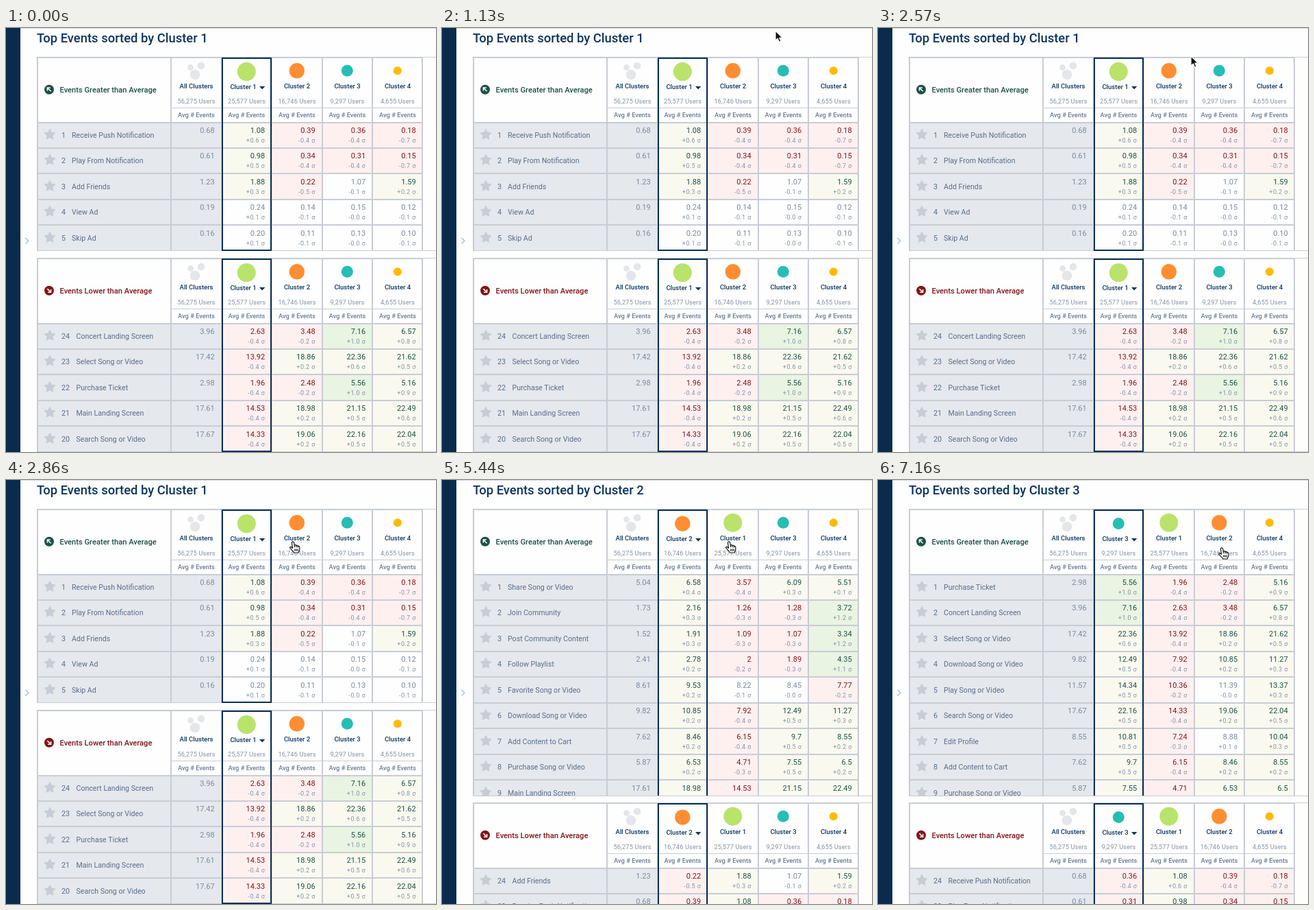
An HTML page with a canvas that plays this animation: 628 by 618 pixels, repeating every 8 s.

```html
<!DOCTYPE html>
<html lang="en">
<head>
<meta charset="utf-8">
<title>Top Events by Cluster</title>
<style>
html, body { margin: 0; width: 100%; height: 100%; overflow: hidden; background: #fdfefd; }
canvas { display: block; width: 628px; height: 618px; }
</style>
</head>
<body>
<canvas id="stage"></canvas>
<script>
const W = 628, H = 618, LOOP = 8000;
const canvas = document.getElementById('stage');
const ctx = canvas.getContext('2d');
const dpr = window.devicePixelRatio || 1;
canvas.width = W * dpr;
canvas.height = H * dpr;

const C = {
  bg: '#fdfefd', navy: '#0a2b4c', ink: '#0d3560', frame: '#0a3157', line: '#c8ccd5', shade: '#e5e8ec',
  name: '#5a6d8a', muted: '#8492a8', value: '#7b8aa2',
  up: '#1c5147', down: '#80151a', cream: '#f9f9ef', pink: '#fff0f0', green: '#e9f4e2'
};

// name: average of all users, averages of clusters 1-4, standard deviation
const EVENTS = {
  push: 'Receive Push Notification: 0.68 1.08 0.39 0.36 0.18 0.72',
  from: 'Play From Notification: 0.61 0.98 0.34 0.31 0.15 0.69',
  friends: 'Add Friends: 1.23 1.88 0.22 1.07 1.59 2',
  view: 'View Ad: 0.19 0.24 0.14 0.15 0.12 0.9',
  skip: 'Skip Ad: 0.16 0.20 0.11 0.13 0.10 0.7',
  concert: 'Concert Landing Screen: 3.96 2.63 3.48 7.16 6.57 3.15',
  select: 'Select Song or Video: 17.42 13.92 18.86 22.36 21.62 8.2',
  ticket: 'Purchase Ticket: 2.98 1.96 2.48 5.56 5.16 2.5',
  main: 'Main Landing Screen: 17.61 14.53 18.98 21.15 22.49 7.7',
  search: 'Search Song or Video: 17.67 14.33 19.06 22.16 22.04 8.5',
  share: 'Share Song or Video: 5.04 3.57 6.58 6.09 5.51 3.8',
  join: 'Join Community: 1.73 1.26 2.16 1.28 3.72 1.65',
  post: 'Post Community Content: 1.52 1.09 1.91 1.07 3.34 1.52',
  follow: 'Follow Playlist: 2.41 2 2.78 1.89 4.35 1.75',
  favorite: 'Favorite Song or Video: 8.61 8.22 9.53 8.45 7.77 4.8',
  download: 'Download Song or Video: 9.82 7.92 10.85 12.49 11.27 5',
  cart: 'Add Content to Cart: 7.62 6.15 8.46 9.7 8.55 4',
  buy: 'Purchase Song or Video: 5.87 4.71 6.53 7.55 6.5 3.5',
  play: 'Play Song or Video: 11.57 10.36 11.39 14.34 13.37 5.6',
  edit: 'Edit Profile: 8.55 7.24 8.88 10.81 10.04 4.5'
};
for (const key in EVENTS) {
  const [name, data] = EVENTS[key].split(': ');
  const nums = data.split(' ');
  EVENTS[key] = { name, sd: +nums.pop(), avg: nums };
}

const CLUSTERS = [
  { name: 'All Clusters', users: '56,275' },
  { name: 'Cluster 1', users: '25,577', r: 13.5, color: '#b9e36b' },
  { name: 'Cluster 2', users: '16,746', r: 11.2, color: '#ff8e32' },
  { name: 'Cluster 3', users: '9,297', r: 8.5, color: '#26bdb5' },
  { name: 'Cluster 4', users: '4,655', r: 6, color: '#ffba08' }
];

const VIEWS = [
  { from: 0, order: [0, 1, 2, 3, 4], split: 325,
    top: 'push from friends view skip', low: 'concert select ticket main search' },
  { from: 4000, order: [0, 2, 1, 3, 4], split: 460,
    top: 'share join post follow favorite download cart buy main', low: 'friends push' },
  { from: 7160, order: [0, 3, 1, 2, 4], split: 460,
    top: 'ticket concert select download play search edit cart buy', low: 'push from' }
];

const LEFT = 45, RIGHT = 609, PITCH = 37.5;
const colX = i => 241 + 73.5 * i;

function rect(x, y, w, h, color) {
  ctx.fillStyle = color;
  ctx.fillRect(x, y, w, h);
}

function disc(x, y, r, color) {
  ctx.fillStyle = color;
  ctx.beginPath();
  ctx.arc(x, y, r, 0, Math.PI * 2);
  ctx.fill();
}

function text(str, x, y, size, color, weight = 400, align = 'left', spacing = 0) {
  ctx.font = `${weight} ${size}px Roboto, sans-serif`;
  ctx.letterSpacing = spacing + 'px';
  ctx.textAlign = align;
  ctx.fillStyle = color;
  ctx.fillText(str, x, y);
}

function stroke(points, width, color) {
  ctx.beginPath();
  points.forEach(([x, y]) => ctx.lineTo(x, y));
  ctx.lineWidth = width;
  ctx.strokeStyle = color;
  ctx.stroke();
}

function star(x, y) {
  ctx.beginPath();
  for (let i = 0; i < 10; i++) {
    const r = i % 2 ? 4.2 : 8.2, a = Math.PI * (i / 5 - 0.5);
    ctx.lineTo(x + r * Math.cos(a), y + r * Math.sin(a));
  }
  ctx.closePath();
  ctx.lineJoin = 'round';
  ctx.lineWidth = 1;
  ctx.fillStyle = ctx.strokeStyle = C.line;
  ctx.fill();
  ctx.stroke();
}

// Round badge with a diagonal arrow: dir -1 is up-left, 1 is down-right
function badge(x, y, dir, color) {
  disc(x, y, 7, color);
  const d = 2.6 * dir;
  stroke([[x - d, y - d], [x + d, y + d]], 1.5, C.bg);
  stroke([[x + d, y - d * 0.7], [x + d, y + d], [x - d * 0.7, y + d]], 1.5, C.bg);
}

function header(y, dir, order) {
  const color = dir < 0 ? C.up : C.down;
  badge(63, y + 47.7, dir, color);
  text(`Events ${dir < 0 ? 'Greater' : 'Lower'} than Average`, 78.5, y + 52, 11.15, color, 500);
  order.forEach((id, i) => {
    const c = CLUSTERS[id], x = colX(i) + 37, sel = i === 1;
    if (id) {
      disc(x - 0.2, y + (sel ? 21.6 : 20.3), c.r, c.color);
    } else {
      disc(269.5, y + 15.5, 4.4, '#e4e6e9');
      disc(285, y + 13, 5.3, '#e4e6e9');
      disc(276, y + 26, 7.3, '#e4e6e9');
    }
    text(c.name, sel ? 346.5 : x, y + (sel ? 47 : 46), 9.5, C.ink, 500, 'center');
    if (sel) {
      ctx.beginPath();
      ctx.moveTo(370, y + 43);
      ctx.lineTo(378.4, y + 43);
      ctx.lineTo(374.2, y + 47.4);
      ctx.fill();
    }
    text(c.users + ' Users', x, y + 68, 9.2, C.muted, 400, 'center', 0.15);
    text('Avg # Events', x, y + 88, 9.3, '#6b7b95', 500, 'center');
  });
  rect(241, y + 74, RIGHT - 241, 1, C.line);
}

function cell(event, id, x, y) {
  const avg = event.avg[id];
  const right = x + 63.7;
  if (!id) {
    text(avg, right, y + 16, 11, C.value, 400, 'right');
    return;
  }
  const sigma = (avg - event.avg[0]) / event.sd;
  const up = sigma > 0.12, down = sigma < -0.12;
  const fill = sigma > 0.95 ? C.green : up ? C.cream : down ? C.pink : C.bg;
  rect(x, y, 73.5, PITCH + 0.5, fill);
  text(avg, right, y + 16, 11, up ? C.up : down ? C.down : C.value, 400, 'right');
  text((sigma > 0 ? '+' : '') + sigma.toFixed(1) + ' σ', right, y + 30, 9, C.muted, 400, 'right', 0.4);
}

function table(y, bottom, dir, keys, order) {
  const rows = keys.split(' ').map(k => EVENTS[k]);
  ctx.save();
  ctx.beginPath();
  ctx.rect(0, y, W, bottom - y);
  ctx.clip();
  header(y, dir, order);
  rect(LEFT, y + 95, colX(1) - LEFT, H, C.shade);
  rows.forEach((event, i) => {
    const top = y + 95 + Math.floor(PITCH * i);
    const rank = dir < 0 ? i + 1 : 24 - i;
    order.forEach((id, j) => cell(event, id, colX(j), top));
    star(64, top + 18.5);
    text(rank, 81, top + 23, 10.7, C.name);
    text(event.name, rank > 9 ? 102.5 : 96, top + 23, 10.6, C.name);
  });
  for (let i = 0; i <= rows.length; i++) {
    const top = y + 95 + Math.max(0, Math.floor(PITCH * i - 0.5));
    rect(LEFT, top, RIGHT - LEFT, 2, C.line);
  }
  rect(LEFT, y, 2, H, C.line);
  for (let i = 0; i < 5; i++) rect(Math.round(colX(i)) - 1, y, 2, H, C.line);
  rect(RIGHT - 2, y, 2, H, C.line);
  rect(LEFT, y, RIGHT - LEFT, 2, C.line);
  rect(RIGHT, y, W - RIGHT, 1, C.line);
  const end = rows.length === 5 ? y + 283 : H + 10;
  ctx.lineJoin = 'miter';
  ctx.lineWidth = 2;
  ctx.strokeStyle = C.frame;
  ctx.strokeRect(316, y + 2, 71, end - y - 3);
  ctx.restore();
  if (end > bottom) rect(LEFT, bottom, W - LEFT, 1, C.line);
  else rect(RIGHT, bottom - 1, W - RIGHT, 1, C.line);
}

function drawPointer(path, x, y, fill, edge) {
  ctx.save();
  ctx.translate(x, y);
  ctx.lineJoin = 'round';
  ctx.lineWidth = 1.2;
  ctx.fillStyle = fill;
  ctx.strokeStyle = edge;
  ctx.fill(path);
  ctx.stroke(path);
  ctx.restore();
}

function arrow(x, y) {
  const p = new Path2D('M0 0V14.2L3.2 11.2L5.5 16.4L8 15.3L5.8 10.3H10.2Z');
  drawPointer(p, x, y, '#111', '#fff');
}

function hand(x, y) {
  const p = new Path2D('M-1.6 1.2C-1.6 -.5 1.4 -.5 1.6 1.2L2.3 5C3.3 4.2 4.8 4.6 5 5.6' +
    'C6 4.9 7.4 5.4 7.5 6.5C8.6 6 9.8 6.7 9.8 8V11C9.8 13 8.4 14 8.2 16H1.6' +
    'C.8 13.8 -2 12 -4.2 9.2C-5 8 -3.6 6.8 -2.4 7.8L-.5 9.4Z');
  const fingers = new Path2D('M2.3 5L2.7 8M5 5.6L5.2 8.2M7.5 6.5V8.6M2.8 10.5V13.4M4.9 10.5V13.4M7 10.5V13.4');
  drawPointer(p, x, y, '#fff', '#111');
  drawPointer(fingers, x, y, 'transparent', '#111');
}

const MOVES = [
  { start: 780, end: 1130, a: [611, 52], b: [487, 4] },
  { start: 2330, end: 2860, a: [486, 3.5], b: [419, 90] },
  { start: 5440, end: 5850, a: [419, 90], b: [502, 99] }
];
const ease = k => k * k * (3 - 2 * k);

function cursor(t) {
  const m = MOVES.filter(v => t >= v.start).pop();
  if (!m) return;
  const k = ease(Math.min(1, (t - m.start) / (m.end - m.start)));
  const [x, y] = m.a.map((v, i) => v + (m.b[i] - v) * k);
  const overHeader = m !== MOVES[0] && y > 44;
  (overHeader ? hand : arrow)(x, y);
}

function draw(t) {
  const view = VIEWS.filter(v => t >= v.from).pop();
  ctx.setTransform(dpr, 0, 0, dpr, 0, 0);
  rect(0, 0, W, H, C.bg);
  rect(21, 0, W - 21, 1, '#d3d6de');
  rect(0, 0, 21, H, C.navy);
  stroke([[28.5, 305.8], [32.8, 310.2], [28.5, 314.6]], 1.5, '#a5c9de');
  text('Top Events sorted by ' + CLUSTERS[view.order[1]].name, 45, 21, 18.4, C.ink, 500);
  table(42, view.split, -1, view.top, view.order);
  table(view.split + 10, H, 1, view.low, view.order);
  cursor(t);
}

function frame() {
  draw(performance.now() % LOOP);
  requestAnimationFrame(frame);
}
frame();
</script>
</body>
</html>
```
